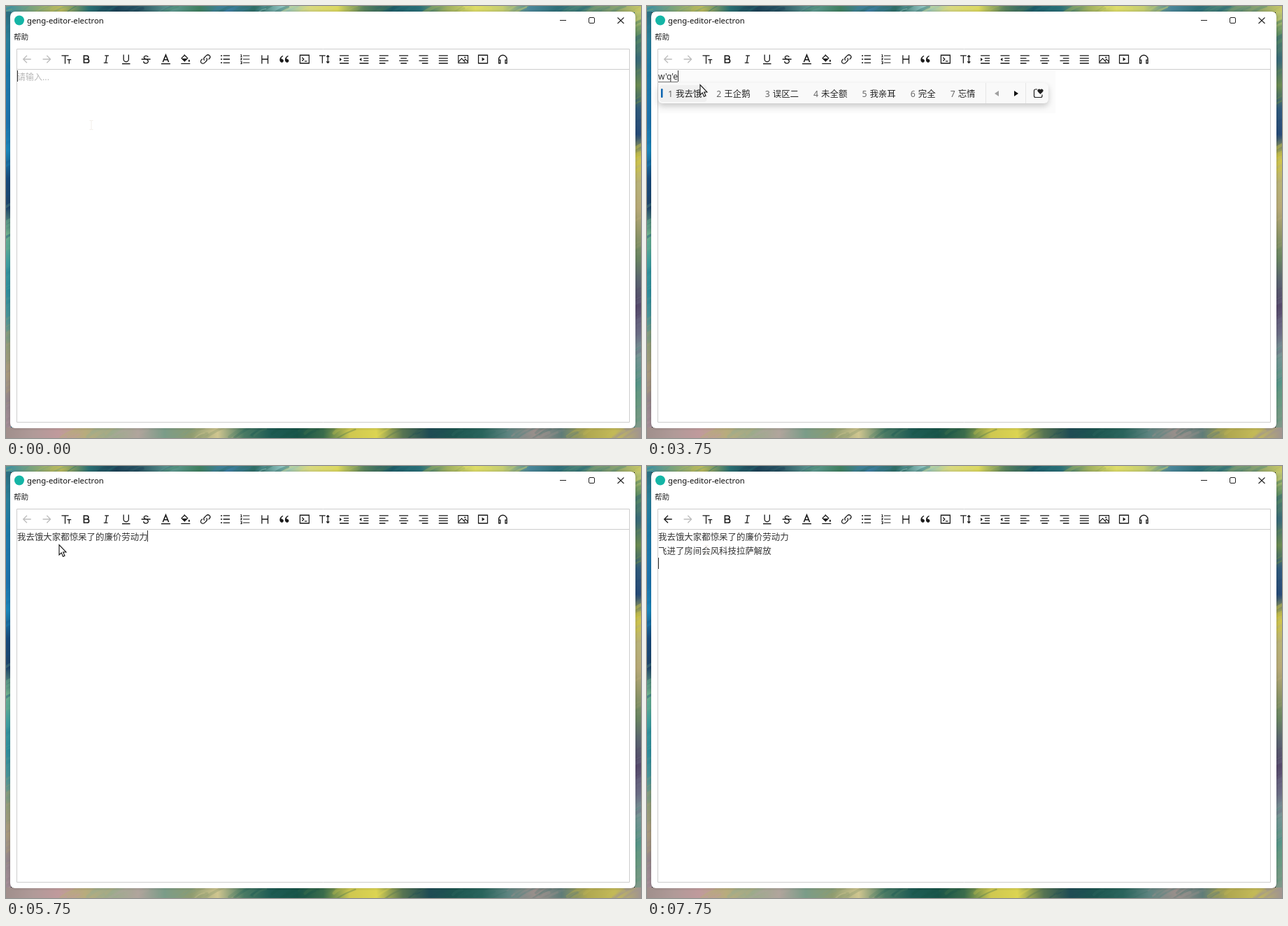
Write an HTML page with a canvas that moves like this. It is 908 px wide and 617 px high and loops after 8 s.

```html
<!DOCTYPE html>
<html lang="zh">
<head>
<meta charset="utf-8">
<title>geng-editor-electron</title>
<style>
html, body { margin: 0; width: 100%; height: 100%; overflow: hidden; background: #2a6f80; }
canvas { display: block; width: 908px; height: 617px; }
</style>
</head>
<body>
<canvas id="stage" width="908" height="617"></canvas>
<script>
const W = 908, H = 617, LOOP = 8000;
const stage = document.getElementById('stage').getContext('2d');
const CJK = '"Noto Sans CJK SC", "Noto Sans CJK", sans-serif';
const LATIN = '"Noto Sans", sans-serif';
const EM = 12.45;

function text(c, s, x, y, size, color, family = CJK) {
  c.font = `${size}px ${family}`;
  c.fillStyle = color;
  c.fillText(s, x, y);
}

function box(c, x, y, w, h, r, fill) {
  c.beginPath();
  c.roundRect(x, y, w, h, r);
  c.fillStyle = fill;
  c.fill();
}

function line(c, d, x, y, scale, width, color, fill) {
  c.save();
  c.translate(x, y);
  c.scale(scale, scale);
  c.lineWidth = width;
  c.strokeStyle = color;
  c.stroke(new Path2D(d));
  if (fill) {
    c.fillStyle = color;
    c.fill(new Path2D(fill));
  }
  c.restore();
}

// Toolbar icons on a 24 unit grid: [stroked path, filled path, stroke width]
const quote = x => `M${x + 1.6} 17.3C${x + .5} 16.2 ${x} 15 ${x} 13C${x} 9.5 ${x + 2.5} 6.4 ${x + 6} 4.8l.9 1.4c-3.3 1.8-4 4.1-4.2 5.6 .5-.3 1.2-.4 1.9-.3a3.5 3.5 0 1 1-3 5.8Z`;
const dot = y => `M3 ${y}a1.4 1.4 0 1 0 2.8 0a1.4 1.4 0 1 0-2.8 0Z`;
const rows = 'M8 5H21M8 12H21M8 19H21';
const indent = 'M3 5H21M3 20H21M11 10H21M11 15H21';
const align = (a, b) => `M3 5H21M${a} 10H${b}M3 15H21M${a} 20H${b}`;
const ICONS = [
  ['M20 12H5M12 4.7L4.7 12l7.3 7.3'],
  ['M4 12H19M12 4.7L19.3 12l-7.3 7.3'],
  ['M2 5H16M9 5V21M13 13H21M17 13V21'],
  ['M7 12V5H12.5a3.5 3.5 0 0 1 0 7H7V19H13.5a3.5 3.5 0 0 0 0-7', '', 2.3],
  ['M9 5H17M7 19H15M13 5L11 19'],
  ['M7 3V12a5 5 0 0 0 10 0V3M4 21H20'],
  ['M3 12H21M16.4 8A4.3 3.6 0 0 0 8 8q0 2.6 4 4q4.5 1.3 4.5 4a4.5 4 0 0 1-9.2.2'],
  ['M6.3 17.5L12 3.5L17.7 17.5M8.3 13H15.7M3 21H21', '', 2.3],
  ['M9 3L16 10L10 16L4 10L10 4M3 21H21', 'M4 10.5H16L10 16ZM19 12.5q3.6 4.6 0 4.6t0-4.6Z', 1.7],
  ['M10 14.2a4 4 0 0 1 0-5.6l4-4a4.2 4.2 0 0 1 6 6l-2 2M14 9.8a4 4 0 0 1 0 5.6l-4 4a4.2 4.2 0 0 1-6-6l2-2', '', 1.7],
  [rows, dot(5) + dot(12) + dot(19)],
  [rows + 'M3 3.4H4.6V7M3 7H6M3 10.3H5.4L3.6 13.5H6M3 17H5.4V21H3M5.4 19H3.8', '', 1.4],
  ['M6 4V21M18 4V21M6 12H18'],
  ['', quote(2) + quote(12.5), 1],
  ['M3 4H21V20H3ZM7 8.5L10.5 12 7 15.5M12 16H17'],
  ['M2 5H14M8 5V20M19 5V19M16.3 7.5L19 4.5l2.7 3M16.3 16.5l2.7 3 2.7-3'],
  [indent, 'M3 9L7 12.5 3 16Z'],
  [indent, 'M7 9L3 12.5l4 3.5Z'],
  [align(3, 15)],
  [align(6, 18)],
  [align(9, 21)],
  [align(3, 21)],
  ['M2.5 4.5H21.5V19.5H2.5ZM3 17L9 10.5L16 18M13.5 15L16.5 12L21 16.5', 'M14 8.5a1.5 1.5 0 1 0 3 0a1.5 1.5 0 1 0-3 0Z', 1.6],
  ['M3 4H21V20H3Z', 'M10 8.3L15.5 12 10 15.7Z'],
  ['M4 14V12a8 8 0 0 1 16 0V14M4 13.5H7V20H4ZM17 13.5H20V20H17Z']
];

function icon(c, i, color) {
  const [d, fill, width = 1.8] = ICONS[i];
  const s = .72;
  line(c, d, 30 + i * 28.35 - 12 * s, 76 - 12 * s, s, width, color, fill);
}

// Painted backdrop: a colour ramp per edge, overlaid with faint slanted dabs
function backdrop(c) {
  const edges = [
    [0, 0, W, 9, '#3d8fa3 #7fa578 #b9b95c #2a6f72 #1c4257 #32606b #5f9a92 #3f7f5f #3f7fa6 #2f6e66 #8fc3c0 #d8d980 #dcd85e #57805c #1d5a66 #2a7078 #9fb060 #dedd68 #c5cd70 #4a8699 #2f6f78 #4d8577 #86a070 #c9c865'],
    [0, 8, 7, 596, '#2d6f80 #2a7f9a #1c7aa8 #1f78ae #1c72ac #1a86ba #174a7c #1f4468 #6fb08c #3f9f9f #2e8c9c #4a9498 #8f9c78 #a89a7c #94868c #a8909a'],
    [899, 8, 9, 596, '#c3c870 #5a8a62 #3a6a78 #6a8a50 #2f5a7c #264a78 #d0c648 #b8b278 #b8aa78 #94986a #6a8662 #5a6470 #55486a #6a6a84 #789494 #559488 #6a9a80 #80988a'],
    [0, 602, W, 15, '#a08f8c #b09a98 #c09a9c #b8ac7c #9cab8c #b0a49c #7a9c88 #8f9c70 #d0c690 #4a7a64 #1f5c54 #185448 #3a6c4c #cfc850 #dcd452 #567452 #1f4c54 #1d5650 #2a645c #5e8480 #9a908c #5f7c78 #b0a850 #c4ba58 #a09490']
  ];
  let seed = 7;
  const rnd = () => (seed = seed * 16807 % 2147483647) / 2147483647;
  for (const [x, y, w, h, list] of edges) {
    const colors = list.split(' '), last = colors.length - 1;
    const wide = w > h;
    const g = c.createLinearGradient(x, y, wide ? x + w : x, wide ? y : y + h);
    colors.forEach((k, i) => g.addColorStop(i / last, k));
    c.save();
    c.beginPath();
    c.rect(x, y, w, h);
    c.clip();
    c.fillStyle = g;
    c.fillRect(x, y, w, h);
    c.lineCap = 'round';
    for (let i = 0; i < 80; i++) {
      const p = rnd();
      const near = Math.round(p * last + (rnd() - .5) * 1.8);
      const px = x + (wide ? p * w : rnd() * w), py = y + (wide ? rnd() * h : p * h);
      const len = 6 + rnd() * 14;
      c.globalAlpha = .15 + rnd() * .35;
      c.strokeStyle = colors[Math.max(0, Math.min(last, near))];
      c.lineWidth = 1 + rnd() * 4;
      c.beginPath();
      c.moveTo(px - len, py + len * .6);
      c.quadraticCurveTo(px, py - 3, px + len, py - len * .5);
      c.stroke();
    }
    c.restore();
  }
}

function frameLayer() {
  const el = document.createElement('canvas');
  el.width = W;
  el.height = H;
  const c = el.getContext('2d');
  backdrop(c);
  c.save();
  c.shadowColor = 'rgba(0,0,0,.2)';
  c.shadowBlur = 4;
  box(c, 6, 8, 894, 595, 7, '#fff');
  c.restore();

  c.beginPath();
  c.arc(19, 20.5, 7, 0, Math.PI * 2);
  c.fillStyle = '#14b5a6';
  c.fill();
  text(c, 'geng-editor-electron', 30, 24.8, 11.3, '#111', LATIN);
  text(c, '帮助', 11, 47.7, 10.6, '#222');
  line(c, 'M792 20.5H801M874.5 16.5l9 8.5M883.5 16.5l-9 8.5', 0, 0, 1, 1.1, '#222');
  c.beginPath();
  c.roundRect(833.5, 16.5, 8, 8, 1.5);
  c.strokeStyle = '#222';
  c.stroke();
  line(c, 'M15.5 61.5H891.5V594.5H15.5ZM15.5 90.5H891.5', 0, 0, 1, 1, '#cdcdcd');
  for (let i = 1; i < ICONS.length; i++) icon(c, i, i === 1 ? '#bdbdbd' : '#1a1a1a');
  return el;
}

const LINE1 = '我去饿大家都惊呆了的廉价劳动力';
const LINE2 = '飞进了房间会风科技拉萨解放';
const SET1 = '我去饿 王企鹅 误区二 未全额 我亲耳 完全';
const SET2 = '房间里 放假了 副经理 否决了 放家里 附件里';

// Input method states: [start, keys, candidates, right end, line, clip]
const INPUT = [
  [3750, 'wqe', SET1 + ' 忘情', 574, 0],
  [4500, 'wqed', '我去饿大 ' + SET1, 592, 0],
  [4750, 'wqedjd', '我去饿大家都 ' + SET1, 623, 0],
  [5000, 'wqedjdjdldl', '我去饿大家都觉得劳动力 ' + SET1, 684, 0],
  [5250, 'wqedjdjdldljldl', LINE1 + ' ' + SET1, 729, 0],
  [5750],
  [6500, 'fj', '附近 房间 放假 副经 否决 飞机 附加', 516, 1],
  [6750, 'fjlf', '附件两份 ' + SET2, 616, 1],
  [7000, 'fjlfjjfkjl', '附件两份拒绝付款记录 ' + SET2, 682, 1, 663],
  [7250]
];

// Pointer states: [start, kind, x, y]
const POINTER = [
  [0, 'beam', 122, 170], [250, 'beam', 57, 97], [500, 'arrow', 51, 84],
  [750, 'beam', 86, 148], [1000, 'arrow', 29, 62], [1250, 'arrow', 29, 51],
  [2000, 'beam', 85, 120], [3750, 'arrow', 75.5, 112], [6250, 'beam', 85, 120]
];

const at = (list, t) => list.filter(s => s[0] <= t).pop();

function caret(c, x, row) {
  c.fillStyle = '#333';
  c.fillRect(Math.round(x), Math.round(92 + row * 19.5), 1, 16);
}

function inputBar(c, [, keys, list, end, row, clip = end + 10]) {
  const dy = row * 20, sep = end - 90;
  c.save();
  c.beginPath();
  c.rect(7, 91, clip - 7, 90);
  c.clip();
  c.fillStyle = '#fbfbfb';
  c.fillRect(16, row ? 109 : 92, end - 6, row ? 60 : 61);
  c.save();
  c.shadowColor = 'rgba(0,0,0,.2)';
  c.shadowBlur = 9;
  c.shadowOffsetY = 4;
  box(c, 16, 110 + dy, end - 16, 29, 6, '#f9f9f9');
  c.restore();

  const words = list.split(' ');
  box(c, 18, 113 + dy, words[0].length * EM + 30, 24, 4, '#f0f0f0');
  box(c, 20, 118 + dy, 2.5, 13, 1.2, '#0a63b0');
  let x = 30;
  words.forEach((word, i) => {
    text(c, String(i + 1), x, 129.5 + dy, 12.3, '#666', LATIN);
    text(c, word, x + 11, 129.7 + dy, EM, '#252525');
    x += 32 + word.length * EM;
  });

  c.fillStyle = '#e6e6e6';
  c.fillRect(sep, 110 + dy, 1, 29);
  c.fillRect(sep + 57, 110 + dy, 1, 29);
  c.fillStyle = '#a0a0a0';
  c.fill(new Path2D(`M${sep + 19} ${121 + dy}v8l-6-4Z`));
  c.fillStyle = '#111';
  c.fill(new Path2D(`M${sep + 41} ${121 + dy}v8l6-4Z`));
  line(c, 'M5 .5H2.5a2 2 0 0 0-2 2V10a2 2 0 0 0 2 2H10a2 2 0 0 0 2-2V8', sep + 69, 118.5 + dy, 1, 1.2, '#222',
    'M9.5 7.5L5.8 3.7A2.2 2.2 0 0 1 9.5 1A2.2 2.2 0 0 1 13.2 3.7Z');
  c.restore();

  const typed = [...keys].join("'");
  const y = 105.2 + row * 19.7;
  text(c, typed, 16, y, 12, '#333', LATIN);
  const right = 16 + c.measureText(typed).width;
  c.fillStyle = '#777';
  c.fillRect(16, 108 + dy, right - 16, 1);
  caret(c, right, row);
}

function pointer(c, [, kind, x, y]) {
  if (kind === 'beam') {
    line(c, 'M-2.5-6.5H-.8L0-6 .8-6.5H2.5M0-6V6M-2.5 6.5H-.8L0 6 .8 6.5H2.5', x, y, 1, 1, '#f2eee8');
    return;
  }
  const d = 'M.5.5V15l3.3-3.1L6 17.2l2.5-1L6.2 11H10.5Z';
  c.save();
  c.translate(x, y);
  c.fillStyle = '#fff';
  c.fill(new Path2D(d));
  c.restore();
  line(c, d, x, y, 1, 1.1, '#111');
}

const base = frameLayer();

function draw(t) {
  const c = stage;
  c.drawImage(base, 0, 0);
  icon(c, 0, t >= 6000 ? '#1a1a1a' : '#bdbdbd');

  if (t < 3750) {
    text(c, '请输入...', 16, 105.5, 12, '#b8b8b8');
    if ((t + 250) % 1000 < 500) caret(c, 16, 0);
  }
  if (t >= 5750) text(c, LINE1, 16, 105.7, EM, '#333');
  if (t >= 7250) text(c, LINE2, 16, 125.5, EM, '#333');

  const input = at(INPUT, t);
  if (input && input[1]) inputBar(c, input);
  else if (t >= 7750) caret(c, 16, 2);
  else if (t >= 7250) caret(c, 16 + LINE2.length * EM, 1);
  else if (t >= 6250) caret(c, 16, 1);
  else if (t >= 5750) caret(c, 16 + LINE1.length * EM - 1, 0);

  pointer(c, at(POINTER, t));
}

const start = performance.now();
function tick() {
  draw((performance.now() - start) % LOOP);
  requestAnimationFrame(tick);
}
tick();
</script>
</body>
</html>
```
